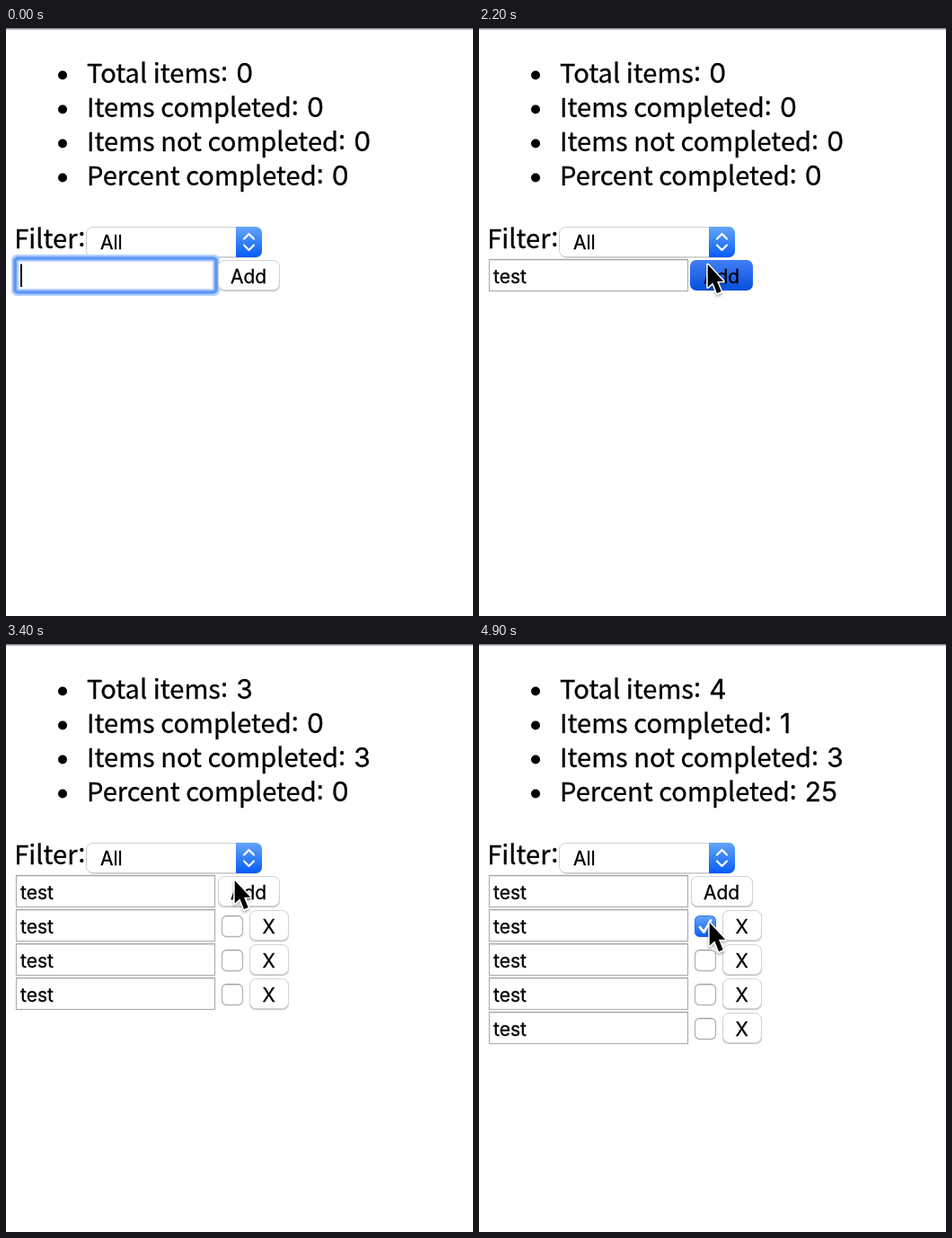
An HTML page that plays this animation: 520x654 px, repeating every 5000 ms.

```html
<!DOCTYPE html>
<html lang="en">
<head>
<meta charset="utf-8">
<title>Item list</title>
<style>
html, body { margin: 0; width: 100%; height: 100%; overflow: hidden; background: #fff; }
svg { display: block; }
text { stroke: #000; stroke-width: .3; }
.page { font: 29.1px "Noto Sans CJK KR", "Noto Sans CJK JP", "Noto Sans CJK SC", "Noto Sans", sans-serif; }
.num { font: 30px Inter, Roboto, sans-serif; }
.ui { font: 21px Inter, Roboto, sans-serif; }
</style>
</head>
<body>
<svg width="520" height="654" viewBox="0 0 520 654">
  <defs>
    <linearGradient id="blue" x2="0" y2="1">
      <stop stop-color="#64a5fa"/><stop offset="1" stop-color="#075cf6"/>
    </linearGradient>
    <linearGradient id="pressed" x2="0" y2="1">
      <stop stop-color="#427ff5"/><stop offset="1" stop-color="#064fdd"/>
    </linearGradient>
    <filter id="shadow" x="-50%" y="-30%" width="200%" height="170%">
      <feDropShadow dx="0" dy="2" stdDeviation="1.5" flood-opacity=".35"/>
    </filter>
  </defs>
  <rect width="520" height="1.5" fill="#808080"/>
  <g id="stats" class="page"></g>
  <g id="select">
    <rect x="90" y="222.3" width="195" height="33.5" rx="7" fill="#ccc"/>
    <rect x="89.5" y="221.5" width="195" height="33" rx="7" fill="#fff" stroke="#cfcfcf"/>
    <path d="M256 221H278a7 7 0 0 1 7 7V248a7 7 0 0 1-7 7H256Z" fill="url(#blue)"/>
    <path d="M265 234.5l5.5-5.5 5.5 5.5M265 241.5l5.5 5.5 5.5-5.5" fill="none" stroke="#fff"
      stroke-width="2.2" stroke-linecap="round" stroke-linejoin="round"/>
    <text class="ui" x="105" y="246">All</text>
  </g>
  <g id="form" class="ui"></g>
  <g id="cursor" filter="url(#shadow)">
    <path d="M.7 1V26.5L6.4 21.3 11 33 15.7 31 11 19.8H18.2Z" stroke="#fff"
      stroke-width="3" paint-order="stroke" stroke-linejoin="round"/>
  </g>
</svg>
<script>
const LOOP = 5000, STEP = 100;
const typed = [100, 400, 600, 700];
const clicks = [[2100, 2300], [2700, 2900], [3100, 3300], [3900, 4100]];
const CHECKED = 4800;
// time, x, y of the pointer
const path = [[1500, 255, 325], [1600, 251, 324], [1700, 249, 323], [1800, 250, 307],
  [1900, 252, 280], [2000, 254, 262], [4100, 254, 262], [4200, 254, 288],
  [4300, 254, 302], [4400, 255, 308], [4600, 255, 308], [4700, 256, 309]];

const $ = id => document.getElementById(id);
const label = (x, y, name, value = '') =>
  `<text x="${x}" y="${y}" xml:space="preserve">${name}<tspan dy="-2">:</tspan>` +
  `<tspan dy="2"> </tspan><tspan class="num" dx="2.5">${value}</tspan></text>`;

const button = (x, y, w, text, tx, down) =>
  (down
    ? `<rect x="${x - 1}" y="${y}" width="${w + 1}" height="34" rx="7" fill="url(#pressed)"/>`
    : `<rect x="${x}" y="${y + 1}" width="${w}" height="34" rx="7" fill="#c6c6c6"/>` +
      `<rect x="${x + .5}" y="${y + .5}" width="${w - 1}" height="33" rx="7" fill="#fff" stroke="#d2d2d2"/>`) +
  `<text x="${tx}" y="${y + 26}">${text}</text>`;

const field = (y, text) =>
  `<rect x="11.5" y="${y + .5}" width="221" height="35" fill="#fff" stroke="#b2b2b2" stroke-width="1.3"/>` +
  `<path d="M11 ${y + .7}H233" stroke="#a2a2a2"/><text x="16" y="${y + 27}">${text}</text>`;

const ring = (inset, width, color) =>
  `<rect x="${8 + inset}" y="${254 + inset}" width="${228 - 2 * inset}" height="${42 - 2 * inset}" ` +
  `rx="${4 - inset / 2}" fill="none" stroke="${color}" stroke-width="${width}"/>`;

function checkbox(y, on) {
  const box = `<rect x="240.5" y="${y + .5}" width="23" height="23" rx="5" `;
  return on
    ? box + `fill="url(#blue)" stroke="#2a6ff0"/><path d="M246 ${y + 13}l4.5 5.5 7.5-13" fill="none" stroke="#fff" stroke-width="2.8" stroke-linecap="round" stroke-linejoin="round"/>`
    : box + `fill="#fff" stroke="#b4b4b4" stroke-width="1.3"/><path d="M245 ${y + .6}H259" stroke="#a0a0a0"/>`;
}

function caretAlpha(t) {
  if (t >= 1100 && t < 1200 || t >= 1500 && t < 1600) return .5;
  return t >= 1200 && t < 1500 ? 0 : 1;
}

function pointer(t) {
  const i = path.findIndex(p => p[0] > t);
  if (i < 0) return path.at(-1).slice(1);
  const [t0, x0, y0] = path[i - 1], [t1, x1, y1] = path[i];
  const k = (t - t0) / (t1 - t0);
  return [x0 + (x1 - x0) * k, y0 + (y1 - y0) * k];
}

function draw(t) {
  const count = clicks.filter(c => t >= c[1]).length;
  const down = clicks.some(([a, b]) => t >= a && t < b);
  const done = t >= CHECKED ? 1 : 0;
  const stats = [['Total items', count], ['Items completed', done],
    ['Items not completed', count - done], ['Percent completed', count ? done / count * 100 : 0]];
  $('stats').innerHTML = stats.map(([name, value], i) =>
    `<circle cx="63" cy="${52.5 + 38 * i}" r="5"/>` + label(90, 61 + 38 * i, name, value)).join('') +
    label(9.2, 245, 'Filter');

  const word = 'test'.slice(0, typed.filter(k => t >= k).length);
  let form = field(257, word);
  if (t < clicks[0][0])
    form += ring(-.5, 3, '#b4d0fb') + ring(2.2, 4, '#5f97f6') + ring(4.8, 2, '#a9c7fa') +
      `<rect id="caret" x="16" y="262.5" width="2" height="25.5" opacity="${caretAlpha(t)}"/>`;
  form += button(236, 258, 69, 'Add', 250, down);
  for (let i = 0; i < count; i++) {
    const y = 295 + 38 * i;
    form += field(y, 'test') + checkbox(y + 7, done && !i) + button(271, y + 1, 44, 'X', 285.5);
  }
  $('form').innerHTML = form;
  if ($('caret') && word)
    $('caret').setAttribute('x', 15 + $('form').querySelector('text').getComputedTextLength());

  const shown = t >= path[0][0];
  $('cursor').style.display = shown ? '' : 'none';
  if (shown) $('cursor').setAttribute('transform', `translate(${pointer(t)})`);
}

let last = -1;
const start = performance.now();
function tick() {
  const t = Math.floor((performance.now() - start) % LOOP / STEP) * STEP;
  if (t !== last) draw(last = t);
  requestAnimationFrame(tick);
}
tick();
</script>
</body>
</html>
```
